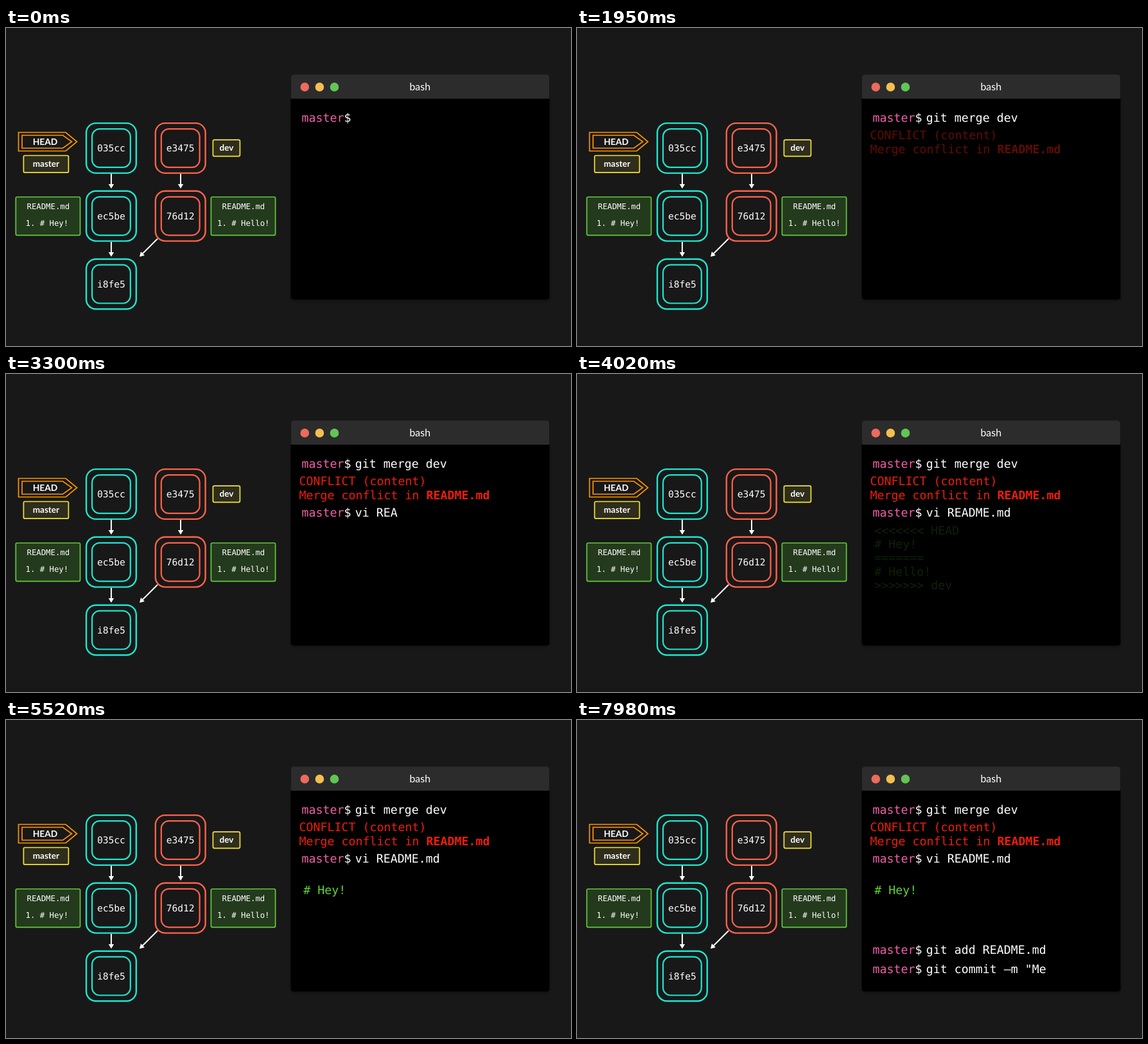
An HTML page for the animation above (8 s loop, 880 by 495 pixels).

```html
<!DOCTYPE html>
<html lang="en">
<head>
<meta charset="utf-8">
<title>Merge conflict</title>
<style>
  html, body { margin: 0; width: 100%; height: 100%; overflow: hidden; background: #181818; }
  svg { display: block; width: 880px; height: 495px; }
  text { fill: #fff; white-space: pre; text-rendering: geometricPrecision; }
  .mono { font-family: "DejaVu Sans Mono", monospace; }
  .label { font-family: Lato, sans-serif; font-weight: 700; text-anchor: middle; }
  .shell { font-size: 18.27px; }
  .hash { font-size: 14.6px; text-anchor: middle; }
  .file { font-size: 12.3px; }
</style>
</head>
<body>
<svg id="stage" viewBox="0 0 880 495">
  <defs>
    <filter id="blur" x="-10%" y="-10%" width="120%" height="120%"><feGaussianBlur stdDeviation="2"/></filter>
  </defs>
  <rect width="880" height="495" fill="#181818"/>
</svg>
<script>
const NS = 'http://www.w3.org/2000/svg';
const stage = document.getElementById('stage');
const LOOP = 8000, TICK = 30, TYPE_TIME = 812;

function add(tag, attrs, content = '', parent = stage) {
  const el = document.createElementNS(NS, tag);
  for (const key in attrs) el.setAttribute(key, attrs[key]);
  el.textContent = content;
  return parent.appendChild(el);
}

function box(x, y, width, height, rx, stroke, lineWidth, fill = 'none') {
  return add('rect', { x, y, width, height, rx, stroke, 'stroke-width': lineWidth, fill });
}

const shellText = (x, y, content, fill = '#fff', parent = stage) =>
  add('text', { x, y, class: 'mono shell', style: `fill:${fill}` }, content, parent);

function label(x, y, size, content, weight = 700) {
  add('text', { x, y, class: 'label', style: `font-size:${size}px;font-weight:${weight}` }, content);
}

function commit(cx, cy, color, hash) {
  box(cx - 38.9, cy - 38.9, 77.8, 77.8, 15, color, 2.4);
  box(cx - 29.9, cy - 29.9, 59.8, 59.8, 12, color, 2.2);
  add('text', { x: cx, y: cy + 5.3, class: 'mono hash' }, hash);
}

function arrow(x1, y1, x2, y2) {
  const length = Math.hypot(x2 - x1, y2 - y1);
  const angle = Math.atan2(y2 - y1, x2 - x1) * 180 / Math.PI;
  add('path', {
    d: `M0-1H${length - 7}V-4.2L${length} 0L${length - 7} 4.2V1H0Z`,
    fill: '#fff', transform: `translate(${x1} ${y1}) rotate(${angle})`
  });
}

function fileCard(x, line, lineX) {
  box(x, 263, 100.2, 59.6, 2, '#5fcb3c', 1.7, '#243a1d');
  add('text', { x: x + 17.2, y: 282, class: 'mono file' }, 'README.md');
  add('text', { x: lineX, y: 308.3, class: 'mono file' }, line);
}

function tag(x, y, width, height, name) {
  box(x, y, width, height, 2, '#f3e33c', 1.7, '#2f2d1c');
  label(x + width / 2, y + height / 2 + 4.4, 13.5, name);
}

function drawGraph() {
  const teal = '#1ee6cf', coral = '#ff624b';
  commit(163.9, 187, teal, '035cc');
  commit(163.9, 292.7, teal, 'ec5be');
  commit(163.9, 398.6, teal, 'i8fe5');
  commit(271.7, 187, coral, 'e3475');
  commit(271.7, 292.7, coral, '76d12');
  arrow(163.9, 227, 163.9, 250);
  arrow(163.9, 333, 163.9, 356);
  arrow(272, 227, 272, 250);
  arrow(236, 328, 208, 356);
  add('path', {
    d: 'M19.5 162.5H93L110.5 177L93 191.5H19.5ZM25 167H88.5L102.5 177L88.5 187H25Z',
    fill: 'none', stroke: '#ff9500', 'stroke-width': 1.7
  });
  label(61, 181.8, 13.8, 'HEAD');
  tag(27.4, 198.5, 70, 26.4, 'master');
  tag(322.4, 174.2, 42, 25.4, 'dev');
  fileCard(15.3, '1. # Hey!', 30.5);
  fileCard(319.4, '1. # Hello!', 329);
}

function drawWindow() {
  add('rect', { x: 445, y: 112, width: 401, height: 312, rx: 5, fill: '#000', opacity: .5, filter: 'url(#blur)' });
  add('path', { d: 'M443.5 109H846.5V418Q846.5 422.5 842 422.5H448Q443.5 422.5 443.5 418Z' });
  add('path', { d: 'M444 110V77.5Q444 72.5 449 72.5H841Q846 72.5 846 77.5V110Z', fill: '#2c2c2c' });
  ['#ed6a5e', '#f5bf4f', '#61c554'].forEach((fill, i) =>
    add('circle', { cx: 465.3 + 23.1 * i, cy: 91.9, r: 6.8, fill }));
  label(644.8, 97.2, 16, 'bash', 400);
}

function prompt(y, showAt, typeAt, text, full = text.length) {
  const group = add('g', {});
  shellText(460.6, y, 'master', '#f15ea8', group);
  shellText(526.6, y, '$', '#fff', group);
  const typed = shellText(543.7, y, '', '#fff', group);
  return t => {
    const step = TYPE_TIME / full;
    const count = t < typeAt ? 0 : Math.floor((t - typeAt) / step) + 1;
    group.setAttribute('visibility', t >= showAt ? 'visible' : 'hidden');
    typed.textContent = text.slice(0, count);
  };
}

function ease(t, start, end) {
  const p = Math.min(1, Math.max(0, (t - start) / (end - start)));
  return p < .5 ? 2 * p * p : 1 - 2 * (1 - p) ** 2;
}

drawGraph();
drawWindow();

const prompts = [
  prompt(146, 0, 690, 'git merge dev'),
  prompt(222.3, 2910, 2930, 'vi README.md'),
  prompt(364, 6060, 6070, 'git add README.md'),
  prompt(394.2, 7410, 7440, 'git commit –m "Merge dev"')
];

const conflict = add('g', {});
shellText(456.6, 173.4, 'CONFLICT (content)', '#ef1d0b', conflict);
const detail = shellText(456.6, 194.5, 'Merge conflict in ', '#ef1d0b', conflict);
add('tspan', { 'font-weight': 700 }, 'README.md', detail);

const editor = ['<<<<<<< HEAD', '# Hey!', '=======', '# Hello!', '>>>>>>> dev'].map((line, i) =>
  shellText(463.3, 250 + 21.2 * i, line, '#5dd336'));

function render(time) {
  const t = Math.floor(time % LOOP / TICK) * TICK;
  prompts.forEach(update => update(t));
  conflict.setAttribute('opacity', ease(t, 1560, 2430));
  const shown = ease(t, 3780, 4650);
  const removed = ease(t, 4770, 5520);
  editor.forEach((line, i) => line.setAttribute('opacity', i === 1 ? shown : shown - removed));
}

const began = performance.now();
function loop() {
  render(performance.now() - began);
  requestAnimationFrame(loop);
}
loop();
</script>
</body>
</html>
```
